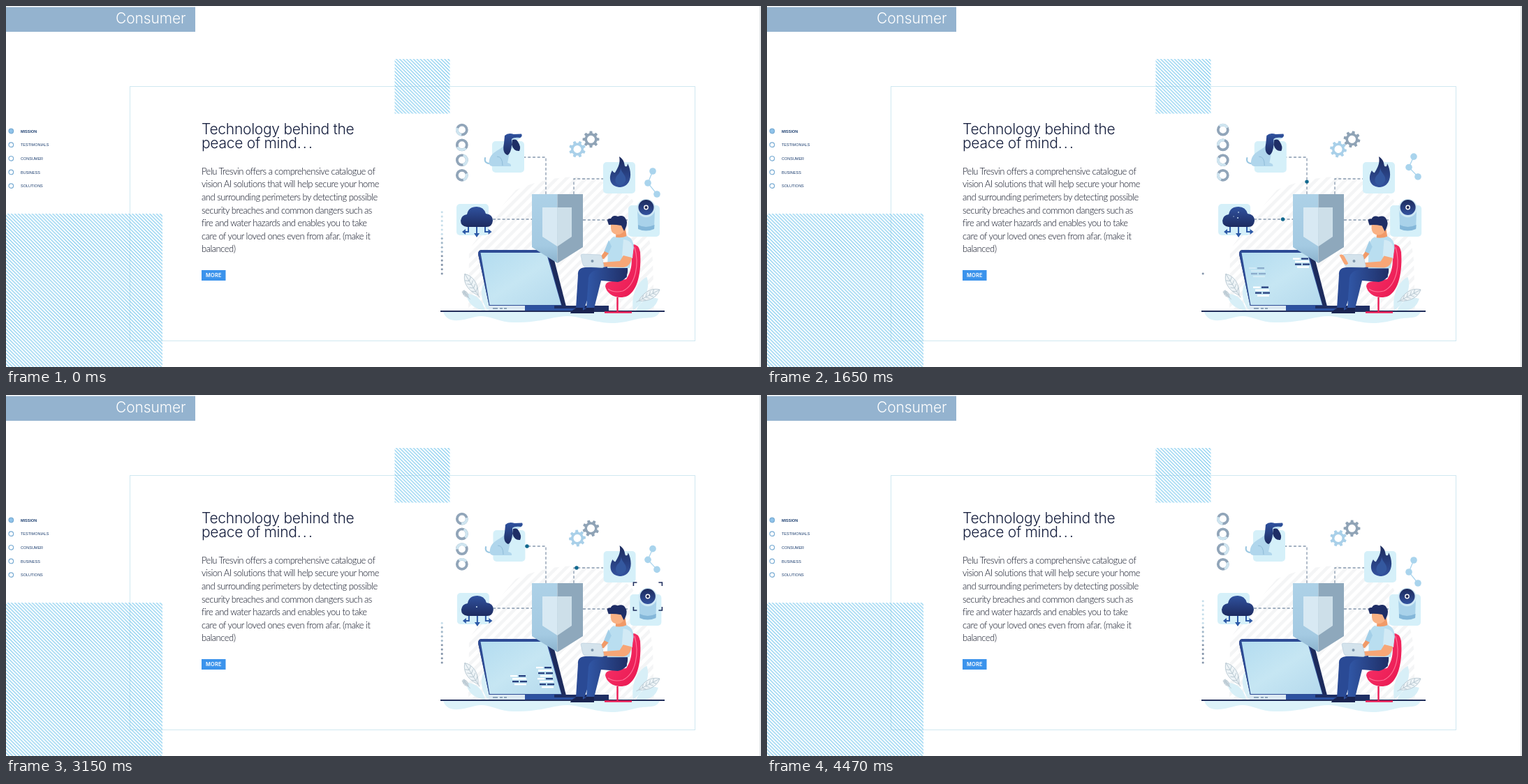
Recreate the animation shown at these times as an HTML page. Size 1081 by 518 pixels, loop 4.5 s.

```html
<!DOCTYPE html>
<html lang="en">
<head>
<meta charset="utf-8">
<title>Consumer</title>
<style>
html, body { margin: 0; width: 100%; height: 100%; overflow: hidden; background: #fff; }
svg { display: block; position: fixed; left: 0; top: 0; width: 100%; height: 100%; }
.head { font: 300 21px Inter, sans-serif; letter-spacing: -.27px; fill: #141d3c; }
.copy { font: 300 13px Lato, sans-serif; letter-spacing: -.5px; fill: #0c1122; }
.nav { font: 5.5px "Liberation Sans", Arial, sans-serif; fill: #1d3f70; }
.more { font: 600 7.4px Inter, sans-serif; fill: #fff; letter-spacing: .25px; }
.link { fill: none; stroke: #8799ae; stroke-width: 1.3; stroke-dasharray: 4 2.8; }
</style>
</head>
<body>
<svg viewBox="0 0 1081 518" xmlns="http://www.w3.org/2000/svg">
<defs>
  <pattern id="hatch" y="345" width="4.95" height="4.95" patternUnits="userSpaceOnUse">
    <path d="M-1-1L5.95 5.95M-1 3.95L1 5.95M3.95-1L5.95 1" stroke="#72c5ec" stroke-width="1.1"/>
  </pattern>
  <pattern id="hatchSmall" href="#hatch" x="482.5" y="0"/>
  <pattern id="bands" width="14" height="14" patternUnits="userSpaceOnUse">
    <path d="M-3 17L17-3M-3 3L3-3M11 17L17 11" stroke="#f4f5f6" stroke-width="4.6"/>
  </pattern>
  <linearGradient id="navy" x2="0" y2="1"><stop stop-color="#30529f"/><stop offset="1" stop-color="#1d2b60"/></linearGradient>
  <linearGradient id="navyUp" x2="0" y2="1"><stop stop-color="#1c2a5c"/><stop offset="1" stop-color="#33539f"/></linearGradient>
  <linearGradient id="glass" x2="1" y2="1"><stop stop-color="#b3dcf0"/><stop offset=".5" stop-color="#c6e6f3"/><stop offset="1" stop-color="#b4d9ed"/></linearGradient>
  <linearGradient id="steel" x2="0" y2="1"><stop stop-color="#add1e7"/><stop offset=".75" stop-color="#a4cae2"/><stop offset="1" stop-color="#8bb2cd"/></linearGradient>
  <linearGradient id="denim" x2="1" y2="0"><stop stop-color="#3158a8"/><stop offset="1" stop-color="#1f2e66"/></linearGradient>
  <linearGradient id="red" x2="1" y2="1"><stop stop-color="#fb3a70"/><stop offset="1" stop-color="#e8164f"/></linearGradient>
</defs>

<rect width="1081" height="518" fill="#fff"/>
<path d="M1079.8 0V518" stroke="#d4d7dc" stroke-width="1.4"/>
<rect y="1.5" width="271" height="35.5" fill="#94b3cf"/>
<text class="head" x="157" y="25" style="fill:#fff;letter-spacing:-.1px">Consumer</text>
<rect x="177.5" y="115.5" width="809" height="365" fill="none" stroke="#d0e8f1"/>
<rect x="556.5" y="76" width="79" height="78.5" fill="url(#hatchSmall)"/>
<rect y="298" width="224" height="220" fill="url(#hatch)"/>
<g id="nav" class="nav"></g>
<text class="head" x="280" y="184">Technology behind the</text>
<text class="head" x="280" y="203.5">peace of mind<tspan letter-spacing="2.2">...</tspan></text>
<g id="copy" class="copy"></g>
<rect x="280" y="379" width="34.5" height="15" fill="#3b93ec"/>
<text class="more" x="286" y="389.2">MORE</text>

<!-- backdrop -->
<path d="M662 437L663 350Q690 310 730 264Q770 246 815 245Q870 250 897 278Q922 320 926 365L928 437Z" fill="url(#bands)"/>
<path d="M626 439C632 456 650 452 672 446C692 441 704 455 730 454C770 455 790 441 815 446C850 453 864 460 900 450C920 445 930 451 936 439Z" fill="#dcf2f9"/>
<g id="leaves"></g>

<!-- links -->
<g class="link">
  <path id="toDog" d="M773 270V217H742"/>
  <path id="toFire" d="M813 270V248H855"/>
  <path id="toCloud" d="M697 306H753"/>
  <path id="toCam" d="M826 307H890"/>
</g>

<!-- cards -->
<g id="cloud">
  <rect x="645" y="284" width="46" height="45" rx="5" fill="#d5f0f9"/>
  <path d="M660 317Q651 316 651 308Q652 300 660 299Q662 288 674 288Q684 288 687 298Q697 299 697 308Q696 317 688 317Z" fill="url(#navy)"/>
  <g fill="none" stroke="#2d5aa8" stroke-width="2"><path d="M662 317V324H656M674 317V327M686 317V324H692"/></g>
  <path d="M653 324L658 320V328ZM674 332L670 326H678ZM695.5 324L690.5 320V328Z" fill="#2d5aa8"/>
  <g id="sparks" fill="#cfe9f7"></g>
</g>
<g id="dogCard"><rect x="696" y="194" width="46" height="45" rx="5" fill="#d5f0f9"/></g>
<g id="dog">
  <path d="M696 226Q684 227 686 218" fill="none" stroke="#9cc8e2" stroke-width="2.2" stroke-linecap="round"/>
  <path d="M715 196C712 207 696 206 692 221Q690 229 696 230H723Q724 226 718 225L722 206Z" fill="#b0d6ec"/>
  <path d="M703 216Q711 216 711 229" fill="none" stroke="#8fbcd8"/>
  <path d="M715 188Q718 183 727 184L738 184Q740 189 732 192L726 205H718Z" fill="#bfe0f1"/>
  <path d="M714 186Q719 181 727 184L738 183.5Q740 187 736 189Q727 188 724 191Q725 210 718 214Q710 211 713 197Z" fill="url(#navy)"/>
  <path d="M725 192Q731 190 733 195Q738 202 735 208Q727 209 724 199Z" fill="#1f2e66"/>
</g>
<g id="fire">
  <rect x="855" y="224" width="46" height="45" rx="5" fill="#d5f0f9"/>
  <path d="M878 216C889 223 883 232 889 230Q890 228 890 226C897 239 896 258 880 260C864 260 862 246 868 236Q870 240 872 239C876 232 880 226 878 216Z" fill="url(#navyUp)"/>
  <path d="M880 232C881 240 889 243 887 251Q884 258 879 257C871 256 871 248 875 243Q880 239 880 232Z" fill="#34589f"/>
</g>
<g id="cam">
  <rect x="891" y="286" width="45" height="45" rx="5" fill="#d5f0f9"/>
  <path d="M904 291H929L928 319Q916 325 905 319Z" fill="#a9d2ea"/>
  <path d="M905 314Q916 320 928.5 314L928 320Q916 325 905 320Z" fill="#84b7d9"/>
  <circle cx="916.5" cy="290" r="13.2" fill="#cfe8f4"/>
  <circle cx="916.5" cy="289" r="11" fill="url(#navyUp)"/>
  <circle cx="916.5" cy="289" r="2.7" fill="#1a2450" stroke="#fff" stroke-width="1.4"/>
  <path id="focus" d="M896 274V269H901M932 269H937V274M937 304V309H932M901 309H896V304" fill="none" stroke="#1f2e5e" stroke-width="1.6"/>
</g>

<g id="dots" fill="#11698f"></g>
<g id="column"></g>
<g id="rings"></g>
<g id="gears"></g>
<g id="nodes" fill="#a9d4ed">
  <path id="mesh" fill="none" stroke="#a9d4ed" stroke-width="1.3"/>
</g>

<!-- laptop -->
<path d="M681 350H777Q781 350 782 353L802 431H692L676 356Q676 350 681 350Z" fill="#1d2b5c"/>
<path d="M681 350H774L796 431H692L676 356Q676 350 681 350Z" fill="#2d4b95"/>
<path d="M679.5 354H773.5L795 429H692.5Z" fill="url(#glass)"/>
<g id="text"></g>
<rect x="691" y="430" width="53" height="8" fill="#dce9f2"/>
<path d="M697 434H704M707 434H711M713 434H717" stroke="#8ea5bb" stroke-width="2"/>
<rect x="743" y="430" width="93" height="8" fill="#2d52a0"/>
<path d="M785 430H863V438H836L832 434H785Z" fill="#1e2e63"/>

<!-- shield -->
<path d="M753 270H789.5V369L753 346Z" fill="url(#steel)"/>
<path d="M789.5 270H826V346L789.5 369Z" fill="#8ea8bc"/>
<path d="M768 289H789.5V345L768 331Z" fill="#d8e9f3"/>
<path d="M789.5 289H810V331L789.5 345Z" fill="#cddfe9"/>

<path d="M622 438H943" stroke="#202d5a" stroke-width="2"/>

<!-- seated figure -->
<path d="M893 342Q906 340 908 353C910 380 905 408 890 416C875 422 860 414 858 402Q858 396 868 395L888 392C898 378 897 360 893 342Z" fill="url(#red)"/>
<path d="M900 346C907 370 902 400 883 409Q870 412 862 406" fill="none" stroke="#ff7197" stroke-width="1.2"/>
<path d="M875.5 418V439M857 439.5H896" stroke="#ec1c56" stroke-width="2.4"/>
<path d="M889 374V389Q880 397 862 394L843 391L828 434H816L819 386Q818 376 829 375Z" fill="#2a4a95"/>
<path d="M890 374Q892 393 876 396L852 394L842 434H831L834 390Q836 380 846 379L862 373Z" fill="url(#denim)"/>
<path d="M816 433H826V441H808Q809 437 816 434ZM831 433H842V441H822Q824 437 831 434Z" fill="#1a2450"/>
<g id="body">
  <path d="M874 320H887L889 333H873Z" fill="#f19a68"/>
  <path d="M866 310Q875 305 885 311L886 321Q882 329 874 328Q867 327 866 319Z" fill="#f9b184"/>
  <path d="M862 311Q859 304 866 305Q869 299 876 302Q884 299 887 305Q891 310 887 319L885 323L881 315Q870 313 863 314Z" fill="#1f2e66"/>
  <path d="M870 331Q880 334 889 330Q899 334 899 347L893 376H861L862 348Q863 334 870 331Z" fill="#b9def0"/>
  <path d="M863 336L856 353L862 356L867 345Z" fill="#a3cfe8"/>
  <path d="M884 335Q898 336 898 352L897 362L882 359Z" fill="#d2eaf5"/>
  <path d="M884 358L896 361Q894 374 884 375L853 374Q848 371 853 368L879 366Z" fill="#f7a676"/>
  <path d="M857 352L863 355L856 363L850 362Z" fill="#f19a68"/>
</g>
<g id="tablet">
  <path d="M823 358Q823 356 826 356L850 357Q853 357 853 360L856 373Q856 376 853 375.5L830 374Q827 374 826 371Z" fill="#d4e3ec" stroke="#b9cddb" stroke-width=".7"/>
  <circle cx="839.5" cy="366" r="2" fill="#7f97ac"/>
  <path id="hand" d="M819 357Q823 354 826 359L831 369Q829 373 825 369Z" fill="#f7a676"/>
</g>
</svg>

<script>
const LOOP = 4500;
const $ = id => document.getElementById(id);

function add(parent, tag, attrs, text) {
  const el = document.createElementNS("http://www.w3.org/2000/svg", tag);
  for (const name in attrs) el.setAttribute(name, attrs[name]);
  if (text) el.textContent = text;
  return (typeof parent === "string" ? $(parent) : parent).appendChild(el);
}

// Linear interpolation through [time, value] keys.
function along(keys, t) {
  if (t <= keys[0][0]) return keys[0][1];
  for (let i = 1; i < keys.length; i++) {
    const [a, va] = keys[i - 1], [b, vb] = keys[i];
    if (t <= b) return va + (vb - va) * (t - a) / (b - a);
  }
  return keys[keys.length - 1][1];
}
const clamp = v => Math.max(0, Math.min(1, v));
const shown = (t, from, to, fade = 120) => clamp(Math.min((t - from) / fade, (to - t) / fade));
const shift = (id, x, y = 0) => $(id).setAttribute("transform", `translate(${x} ${y})`);

["MISSION", "TESTIMONIALS", "CONSUMER", "BUSINESS", "SOLUTIONS"].forEach((label, i) => {
  const y = 179.5 + i * 19.65;
  add("nav", "circle", { cx: 7.3, cy: y, r: 3.3, fill: i ? "#fff" : "#8fc3ea", stroke: "#78abd3", "stroke-width": 1.2 });
  add("nav", "text", { x: 21, y: y + 2.2, "font-weight": i ? 400 : 700 }, label);
});

["Pelu Tresvin offers a comprehensive catalogue of",
 "vision AI solutions that will help secure your home",
 "and surrounding perimeters by detecting possible",
 "security breaches and common dangers such as",
 "fire and water hazards and enables you to take",
 "care of your loved ones even from afar. (make it",
 "balanced)"].forEach((line, i) => add("copy", "text", { x: 280, y: 241.7 + i * 18.6 }, line));

function leaf(x, y, angle, length, width, veined) {
  const g = add("leaves", "g", { transform: `translate(${x} ${y}) rotate(${angle})` });
  add(g, "path", {
    d: `M0 0C${-width} ${-length * .35} ${-width} ${-length * .75} 0 ${-length}C${width} ${-length * .75} ${width} ${-length * .35} 0 0Z`,
    fill: veined ? "#eef4f7" : "#d8eff7", stroke: veined ? "#b3c4ce" : "none", "stroke-width": .8
  });
  if (!veined) return;
  let d = `M0 4V${-length}`;
  for (let k = 1; k < 5; k++) {
    const v = -length * k / 6, w = width * .55;
    d += `M${-w} ${v - 4}L0 ${v}L${w} ${v - 4}`;
  }
  add(g, "path", { d, fill: "none", stroke: "#b3c4ce", "stroke-width": .8 });
}
leaf(690, 437, -4, 44, 10);
leaf(686, 437, -48, 36, 9);
leaf(676, 415, -32, 36, 9, true);
leaf(662, 418, -40, 12, 4, true);
leaf(898, 437, 22, 52, 11);
leaf(902, 437, 62, 36, 10);
leaf(906, 423, 62, 34, 8, true);

const sparks = [[674, 296], [667, 302], [673, 304], [682, 301], [678, 309], [664, 309]]
  .map(([cx, cy]) => add("sparks", "circle", { cx, cy, r: 1 }));

const column = Array.from({ length: 15 }, (_, i) => add("column", "circle", {
  cx: 624.2, cy: 384 - i * 6.3, r: 1.55,
  fill: i < 5 ? "#8495aa" : i < 9 ? "#9fb6c8" : "#c6deea"
}));

const RING = 2 * Math.PI * 7;
const rings = [[30, 95], [32, 40], [42, -75], [26, -20]].map(([share, start], i) => {
  const cy = 177.7 + i * 21.7, base = { cx: 652.8, cy, r: 7, fill: "none", "stroke-width": 3.8 };
  add("rings", "circle", { ...base, stroke: "#91a5b9" });
  const el = add("rings", "circle", { ...base, stroke: "#cfe5f0", "stroke-dasharray": `${RING * share / 100} ${RING}` });
  return { el, cy, start };
});

function gear(x, y, fill) {
  let d = "";
  const teeth = 8, step = 2 * Math.PI / teeth;
  for (let i = 0; i < teeth; i++)
    [[-.32, 9], [-.19, 12], [.19, 12], [.32, 9]].forEach(([part, r]) => {
      const a = (i + part) * step;
      d += `${d ? "L" : "M"}${(r * Math.cos(a)).toFixed(2)} ${(r * Math.sin(a)).toFixed(2)}`;
    });
  d += "ZM5.5 0A5.5 5.5 0 1 0-5.5 0A5.5 5.5 0 1 0 5.5 0Z";
  const el = add("gears", "path", { d, fill, "fill-rule": "evenodd" });
  return angle => el.setAttribute("transform", `translate(${x} ${y}) rotate(${angle})`);
}
const spinLight = gear(818, 205.5, "#a9d0e9");
const spinDark = gear(837.5, 191.3, "#8fa3b6");

const nodes = [[926, 237, 25], [919, 254, 27], [932, 270, 30]].map(([x, y, rise]) =>
  ({ x, y, rise, el: add("nodes", "circle", { cx: x, r: 4.8 }) }));

// Each dot: its path and the distance travelled at given times.
const dots = [
  ["toDog", [[1500, 0], [2040, 64], [2970, 83], [3150, 80], [3900, 64], [4440, 0]]],
  ["toFire", [[1800, 0], [2040, 13], [2970, 29], [3150, 26], [3900, 13], [4140, 0]]],
  ["toCloud", [[590, 0], [690, 5], [1320, 33.5], [2040, 51], [2220, 56]]],
  ["toCam", [[380, 0], [690, 18], [1290, 62]]]
].map(([path, keys]) => ({ path: $(path), keys, el: add("dots", "circle", { r: 2.7 }) }));

// Bars of a code block: row, offset, width, colour.
const BARS = [
  [0, 0, 10, "#fff"], [0, 12, 10, "#27407f"],
  [1, 3, 20, "#fff"],
  [2, 3, 9, "#27407f"], [2, 14, 10, "#27407f"],
  [3, 6, 17, "#fff"]
];
function block(x, y, from, to, double) {
  const g = add("text", "g", {});
  const bars = [];
  for (let n = 0; n < (double ? 2 : 1); n++)
    BARS.forEach(([line, dx, w, fill]) => {
      const row = line + n * 4;
      bars.push({ w, row, el: add(g, "rect", { x: x + dx + n * 2, y: y + row * 4, height: 2.3, fill }) });
    });
  return t => {
    g.setAttribute("opacity", shown(t, from, to, 150));
    bars.forEach(({ el, w, row }) => el.setAttribute("width", w * clamp((t - from - row * 35) / 150)));
  };
}
const blocks = [
  block(690, 375, 420, 1700),
  block(753, 361.5, 1000, 2450),
  block(696, 402.5, 1230, 2600),
  block(722, 402, 2700, 4250),
  block(759, 390, 2660, 3600, true)
];

const COLUMN = [[60, 15], [690, 6], [1150, 0], [1500, 0], [2040, 3], [3150, 10], [3900, 14], [4200, 15]];

function draw(t) {
  const turn = t / LOOP, swell = (1 - Math.cos(2 * Math.PI * turn)) / 2;

  nodes.forEach(n => n.el.setAttribute("cy", n.y - n.rise * swell));
  $("mesh").setAttribute("d", "M" + nodes.map(n => `${n.x} ${n.y - n.rise * swell}`).join("L"));
  shift("cloud", 1.3 * swell);
  shift("dogCard", 2.2 * swell);
  shift("dog", 1.6 * swell);
  shift("cam", along([[0, 0], [690, 0], [2040, 1.6], [3150, 2.4], [3900, 1.2], [4470, 0]], t));
  shift("fire", along([[0, 0], [690, -.8], [1320, -2], [2040, -2], [3150, .6], [4470, 0]], t));

  const count = Math.round(along(COLUMN, t));
  column.forEach((el, i) => el.setAttribute("visibility", i < count ? "visible" : "hidden"));
  rings.forEach(r => r.el.setAttribute("transform", `rotate(${r.start + 360 * turn} 652.8 ${r.cy})`));
  spinLight(22.5 + 90 * turn);
  spinDark(-90 * turn);

  dots.forEach(({ path, keys, el }) => {
    const p = path.getPointAtLength(along(keys, t));
    el.setAttribute("cx", p.x);
    el.setAttribute("cy", p.y);
    el.setAttribute("opacity", shown(t, keys[0][0], keys[keys.length - 1][0], 90));
  });

  blocks.forEach(update => update(t));
  sparks.forEach((el, i) => el.setAttribute("opacity",
    i === 2 ? shown(t, 1200, 3350) : shown(t, 1500 + i * 70, 2600 + i * 60, 200)));
  $("focus").setAttribute("opacity", shown(t, 2700, 3600));

  const hold = shown(t, 300, 2700, 300);
  $("hand").setAttribute("opacity", hold);
  $("tablet").setAttribute("transform", `translate(${hold} 0) rotate(${-2 * hold} 840 366)`);
  shift("body", -.5 * swell, .5 * swell);
}

const begin = performance.now();
function tick() {
  draw((performance.now() - begin) % LOOP);
  requestAnimationFrame(tick);
}
tick();
</script>
</body>
</html>
```
